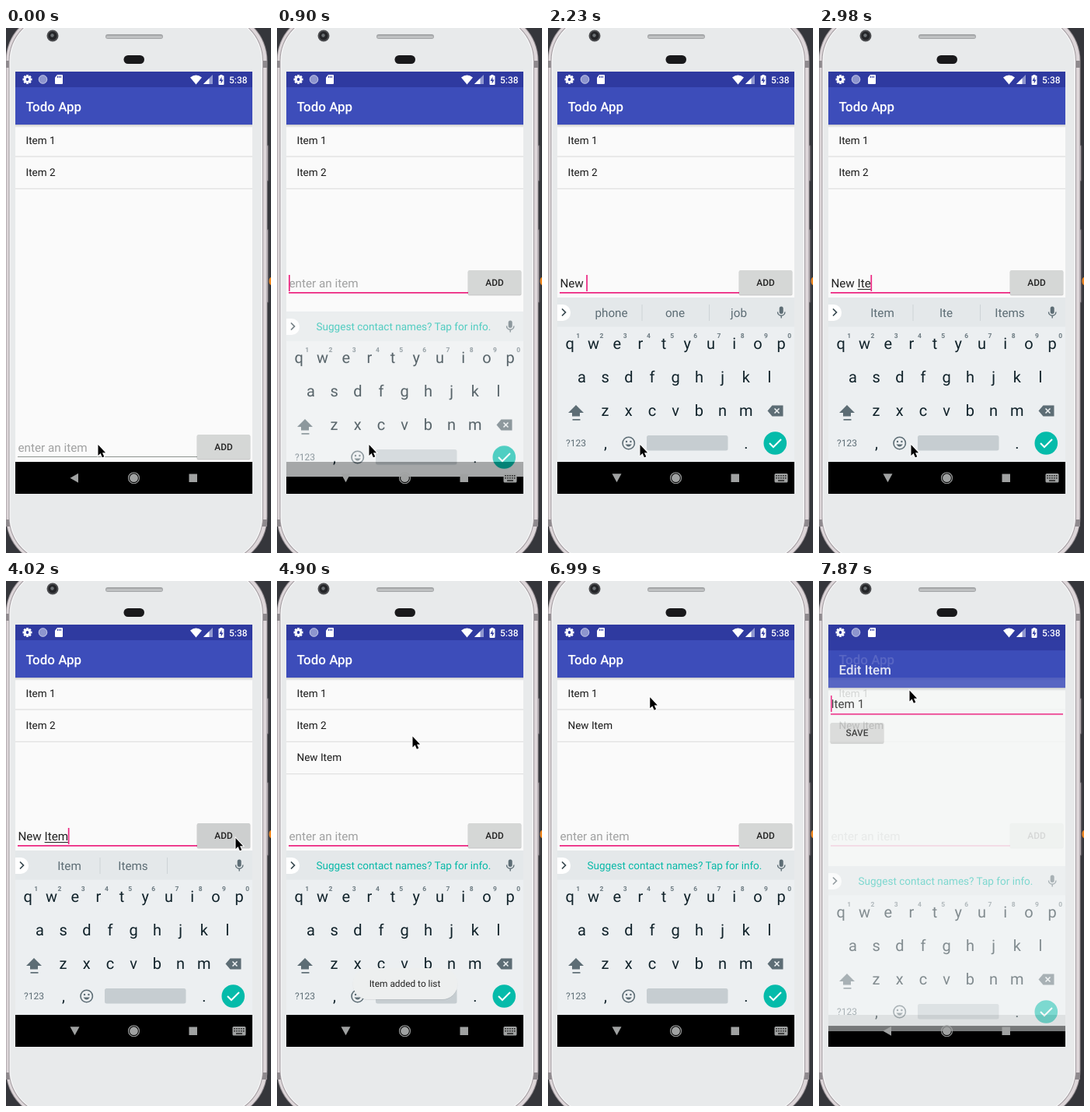
Animation, 341 px wide and 674 px high, one loop 8 s. Source, as an HTML page with a canvas:

```html
<!DOCTYPE html>
<html lang="en">
<head>
<meta charset="utf-8">
<title>Todo App</title>
<style>
  html, body { margin: 0; width: 100%; height: 100%; overflow: hidden; background: #35363b; }
  canvas { display: block; }
</style>
</head>
<body>
<canvas id="stage" width="341" height="674"></canvas>
<script>
const W = 341, H = 674, LOOP = 8000, STEP = 148.33, NAV_TOP = 557;
const PINK = '#ec2580', TEAL = '#08b9a8', BLUE = '#3d4dba', DARK_BLUE = '#2f3aa0';
const stage = document.getElementById('stage').getContext('2d');
const buffer = Object.assign(document.createElement('canvas'), { width: W, height: H });
const layerContext = buffer.getContext('2d');
for (const context of [stage, layerContext]) {
  context.textRendering = 'geometricPrecision';
  context.fontKerning = 'normal';
}
let g = stage;

const clamp = v => Math.max(0, Math.min(1, v));
const ramp = (t, from, to) => clamp((t - from) / (to - from));

function rect(x, y, w, h, color, radius = 0) {
  g.fillStyle = color;
  g.beginPath();
  g.roundRect(x, y, w, h, radius);
  g.fill();
}
function circle(x, y, r, color) {
  g.fillStyle = color;
  g.beginPath();
  g.arc(x, y, r, 0, 7);
  g.fill();
}
function ring(x, y, r, color, width) {
  g.strokeStyle = color;
  g.lineWidth = width;
  g.beginPath();
  g.arc(x, y, r, 0, 7);
  g.stroke();
}
function path(d, color, x = 0, y = 0, lineWidth = 0) {
  const shape = new Path2D(d);
  g.save();
  g.translate(x, y);
  g.fillStyle = g.strokeStyle = color;
  g.lineWidth = lineWidth;
  if (lineWidth) g.stroke(shape); else g.fill(shape);
  g.restore();
}
function text(s, x, baseline, size, color, align = 'left', weight = 400) {
  g.font = `${weight} ${size}px Roboto, sans-serif`;
  g.textAlign = align;
  g.fillStyle = color;
  g.fillText(s, x, baseline);
  return g.measureText(s).width;
}
// Draws a group on its own surface so it can fade as one picture.
function layer(alpha, dy, bottom, draw) {
  if (alpha <= 0) return;
  g = layerContext;
  g.clearRect(0, 0, W, H);
  draw();
  g = stage;
  g.save();
  g.beginPath();
  g.rect(12, 56, 305, bottom - 56);
  g.clip();
  g.globalAlpha = alpha;
  g.drawImage(buffer, 0, dy);
  g.restore();
}

// Time, field content, word suggestions
const typing = [
  [820, ''],
  [1770, 'N', ['No', 'Not', 'Now']],
  [1910, 'Ne', ['New', 'Need', 'Never']],
  [2060, 'New', ['New', 'News', 'Newer']],
  [2210, 'New ', ['phone', 'one', 'job']],
  [2510, 'New I', ['I', "I'm", 'In']],
  [2810, 'New It', ['It', 'Its', "It's"]],
  [2910, 'New Ite', ['Item', 'Ite', 'Items']],
  [3550, 'New Item', ['Item', 'Items', '']],
  [4140, '']
];
// Time, pointer x, pointer y
const pointerPath = [
  [0, 118.5, 535], [3430, 118.5, 535], [4005, 295.5, 330], [4470, 295.5, 330],
  [4900, 174.5, 199.5], [5200, 174.5, 194.5], [6400, 174.5, 194.5], [6680, 172, 191],
  [6975, 131.5, 149.5], [7260, 116.5, 140.5], [LOOP, 116.5, 140.5]
];
const ADDED = 4140, REMOVED = 5780, OPEN = 7700;

function drawPhone() {
  rect(0, 0, W, H, '#35363b');
  circle(344, 325, 6, '#f0871f');
  for (const [y, h] of [[150, 47], [258, 95]]) {
    rect(333, y, 5.5, h, '#57535a', 2);
    rect(334, y + 1, 3, h - 2, '#d3ccd0', 1);
  }
  rect(-0.5, -20, 337, 710, '#8d878c', 62);
  rect(0.5, -19, 335, 708, '#ddd6d9', 61);
  for (const y of [42, 631]) {
    rect(0, y, 5, 9, '#8e898d');
    rect(329, y, 7, 9, '#8e898d');
  }
  rect(3.5, -16, 327.5, 702, '#a19b9f', 58);
  rect(4.5, -15, 325.5, 700, '#f4f4f5', 57);
  rect(6, -14, 322.5, 698, '#e8eaeb', 56);
  circle(60, 10, 7.5, '#4c4d50');
  circle(60, 10, 5.5, '#242528');
  circle(59.5, 9.5, 2.2, '#6c7175');
  rect(128, 8, 74, 6, '#a3a5a7', 3);
  rect(129, 10, 72, 3, '#bfc1c2', 2);
  rect(151.5, 35, 26.5, 11, '#19191b', 5.5);
}

function drawStatusBar() {
  for (let i = 0; i < 8; i++) {
    g.save();
    g.translate(27.5, 66);
    g.rotate(i * Math.PI / 4);
    rect(-1.4, -6, 2.8, 4, '#fff');
    g.restore();
  }
  ring(27.5, 66, 3.3, '#fff', 2.6);
  circle(47.5, 66, 5.8, '#8d95ce');
  ring(47.5, 66, 5.2, '#b9bee3', 1);
  path('M3 0H9Q10 0 10 1V11Q10 12 9 12H1Q0 12 0 11V3.5Z', '#fff', 63, 60);
  for (const x of [66, 68, 70]) rect(x, 61.5, 1, 2.5, DARK_BLUE);
  path('M0 3Q7.5 -3 15 3L7.5 12Z', '#fff', 237, 60.5);
  path('M12 0V12H0Z', '#8f97cf', 254, 60);
  path('M7.5 4.5V12H0Z', '#fff', 254, 60);
  rect(275.5, 60, 3, 2, '#fff');
  rect(273.5, 61, 7, 12, '#fff', 1);
  path('M4 1L1 6.5H3.2V10L6 5H3.9Z', DARK_BLUE, 273.5, 61.5);
  text('5:38', 287, 70.6, 12, '#fff', 'left', 500);
}

function drawWindow(title, paper) {
  rect(12, 56, 305, 502, paper);
  rect(12, 56, 305, 20, DARK_BLUE);
  const shade = g.createLinearGradient(0, 124, 0, 128);
  shade.addColorStop(0, '#00000030');
  shade.addColorStop(1, '#0000');
  rect(12, 124, 305, 4, shade);
  rect(12, 76, 305, 48, BLUE);
  text(title, 25.5, 106.5, 16.95, '#fff', 'left', 500);
}

function drawButton(label, x, y, w, h, color) {
  rect(x - 0.5, y + 0.5, w + 1, h + 1, '#0000002e', 2);
  rect(x, y, w, h, color, 1.5);
  text(label, x + w / 2, y + h / 2 + 4.3, 11.86, '#222', 'center', 500);
}

function drawList(t, entry, caret) {
  drawWindow('Todo App', '#fafafa');
  const items = ['Item 1'];
  if (t < REMOVED) items.push('Item 2');
  if (t >= ADDED) items.push('New Item');
  items.forEach((item, i) => {
    text(item, 25.5, 149 + i * 41.2, 13.56, '#1a1a1a');
    rect(12, 164.4 + i * 41.4, 305, 1, '#dadada');
  });

  const top = t < 880 ? 522 : 311;
  const focused = t >= 740;
  const value = entry ? entry[1] : '';
  const baseline = top + 22;
  const width = value ? text(value, 15.4, baseline, 15.25, '#222') : 0;
  if (!value) text('enter an item', 15.4, baseline, 15.25, '#a0a1a1');
  const word = value.split(' ').pop();
  if (word) {
    const wordWidth = g.measureText(word).width;
    rect(15.4 + width - wordWidth, baseline + 2, wordWidth, 1, '#222');
  }
  rect(15, top + 28, 231, focused ? 1.8 : 1, focused ? PINK : '#8d938f');
  if (caret) rect(15 + width, top + 6, 1.7, 21, PINK);
  const pressed = t > 4000 && t < 4590;
  drawButton('ADD', 246, top, 68, 31, pressed ? '#cdcfcf' : '#d5d7d6');
}

function drawEditor() {
  drawWindow('Edit Item', '#f4f6f5');
  text('Item 1', 15.4, 150.3, 15.25, '#222');
  rect(15, 157, 299, 1.8, PINK);
  rect(15, 134, 1.7, 21, PINK);
  drawButton('SAVE', 15, 169, 68, 25.5, '#d5d7d6');
}

function drawKeyboard(words) {
  const ink = '#10222a', soft = '#5d6d75';
  rect(12, 346, 305, 212, '#eceff1');
  rect(12, 346, 305, 37.5, '#e4e8ea');
  rect(12, 355, 17, 21, '#fff', [0, 10, 10, 0]);
  path('M0 0L4.5 4.5L0 9', '#37474f', 18, 360.5, 1.7);
  if (words) {
    words.forEach((word, i) => text(word, 81.5 + i * 82, 371, 15.25, soft, 'center'));
    rect(120.5, 355, 1, 21, '#cdd3d6');
    rect(207, 355, 1, 21, '#cdd3d6');
  } else {
    text('Suggest contact names? Tap for info.', 50.5, 370.3, 13.56, TEAL);
  }
  rect(297.7, 357.5, 5, 9.5, soft, 2.5);
  path('M0 0A4.7 4.7 0 0 0 9.4 0M4.7 4.7V8', soft, 295.5, 364.5, 1.4);

  const row = (letters, x, y) => [...letters].forEach(
    (letter, i) => text(letter, x + i * 30.2, y, 20, ink, 'center'));
  row('qwertyuiop', 28.3, 412);
  row('asdfghjkl', 43.4, 455);
  row('zxcvbnm', 73.5, 498);
  [...'1234567890'].forEach((digit, i) => text(digit, 38.8 + i * 30.2, 398, 8.5, '#6d7b82', 'center', 700));

  path('M10 0L20 10H15V14.5H5V10H0Z', soft, 26, 484);
  rect(31.5, 502, 10, 1.7, soft);
  path('M6 0H20V14H6L0 7Z', soft, 282.5, 484.5);
  path('M0 0L6 6M6 0L0 6', '#eceff1', 291.5, 488.5, 1.6);

  text('?123', 36, 537.3, 12, soft, 'center');
  text(',', 74, 540, 20, ink, 'center');
  text('.', 255, 540, 20, ink, 'center');
  ring(103.7, 533, 7.7, soft, 1.6);
  circle(101, 531, 1.2, soft);
  circle(106.4, 531, 1.2, soft);
  path('M0 0Q4.2 6 8.4 0Z', soft, 99.5, 534.5);
  rect(127, 523, 104.5, 19.5, '#c6cdd1', 2.5);
  circle(292.3, 533, 14.8, '#05bbaa');
  path('M0 5L5 10L15 0', '#fff', 285, 528, 2);
}

function drawNavIcons(keyboardUp) {
  const gray = '#a0a2a2';
  path(keyboardUp ? 'M0 .5H12L6 11.5Z' : 'M10.5 0V12L0 6Z', gray, 82.5, 571.7);
  circle(164.5, 577.7, 5.4, gray);
  ring(164.5, 577.7, 7, gray, 1.1);
  rect(235.5, 572.5, 10.5, 10.5, gray);
  if (!keyboardUp) return;
  rect(291.5, 572, 17, 11.5, gray, 1.5);
  for (let i = 0; i < 10; i++) rect(293.3 + i % 5 * 2.9, 574 + Math.floor(i / 5) * 3, 1.6, 1.6, '#222');
  rect(296, 580.3, 8, 1.5, '#222');
}

function drawToast() {
  rect(97.5, 498, 135, 40, '#00000012', 20);
  rect(97.5, 497, 135, 40, '#edefef', 20);
  text('Item added to list', 164.5, 521.2, 11.86, '#222', 'center');
}

function drawPointer(t) {
  const i = pointerPath.findIndex(p => p[0] > t);
  const [from, x0, y0] = pointerPath[i - 1], [to, x1, y1] = pointerPath[i];
  const p = ramp(t, from, to);
  const x = x0 + (x1 - x0) * p, y = y0 + (y1 - y0) * p;
  const arrow = 'M0 0V14L3.1 11.1L5.4 16.3L7.8 15.2L5.5 10.2H9.6Z';
  path(arrow, '#fff', x, y, 1.8);
  path(arrow, '#000', x, y);
}

function draw(time) {
  // The screen refreshes in even steps after the opening pause.
  const t = Math.max(0, 750 + STEP * Math.floor((time - 742) / STEP));
  const entry = typing.findLast(e => e[0] <= t);
  const caret = t < OPEN && entry && (t - entry[0]) % 1000 < 500;
  const shown = ramp(t, 750, 962), hidden = ramp(t, OPEN, OPEN + 340);

  drawPhone();
  rect(12, NAV_TOP, 305, 598 - NAV_TOP, '#000');
  layer(1, 0, NAV_TOP, () => drawList(t, entry, caret));
  const offset = 43 * (1 - ramp(t, OPEN, OPEN + 350)) ** 1.8;
  layer(ramp(t, OPEN, OPEN + 198), offset, 598, drawEditor);
  rect(12, 56, 305, 20, DARK_BLUE);
  drawStatusBar();
  const keyboardBottom = shown < 1 || hidden > 0 ? 598 : NAV_TOP;
  layer(shown * (1 - hidden), 60 * (1 - shown) + 40 * hidden, keyboardBottom,
    () => drawKeyboard(entry && entry[2]));
  drawNavIcons(shown > 0 && hidden < 0.3);
  layer(ramp(t, 4200, 4600) * (1 - ramp(t, 6200, 6600)), 0, 598, drawToast);
  drawPointer(t);
}

function tick() {
  draw(performance.now() % LOOP);
  requestAnimationFrame(tick);
}
tick();
</script>
</body>
</html>
```
